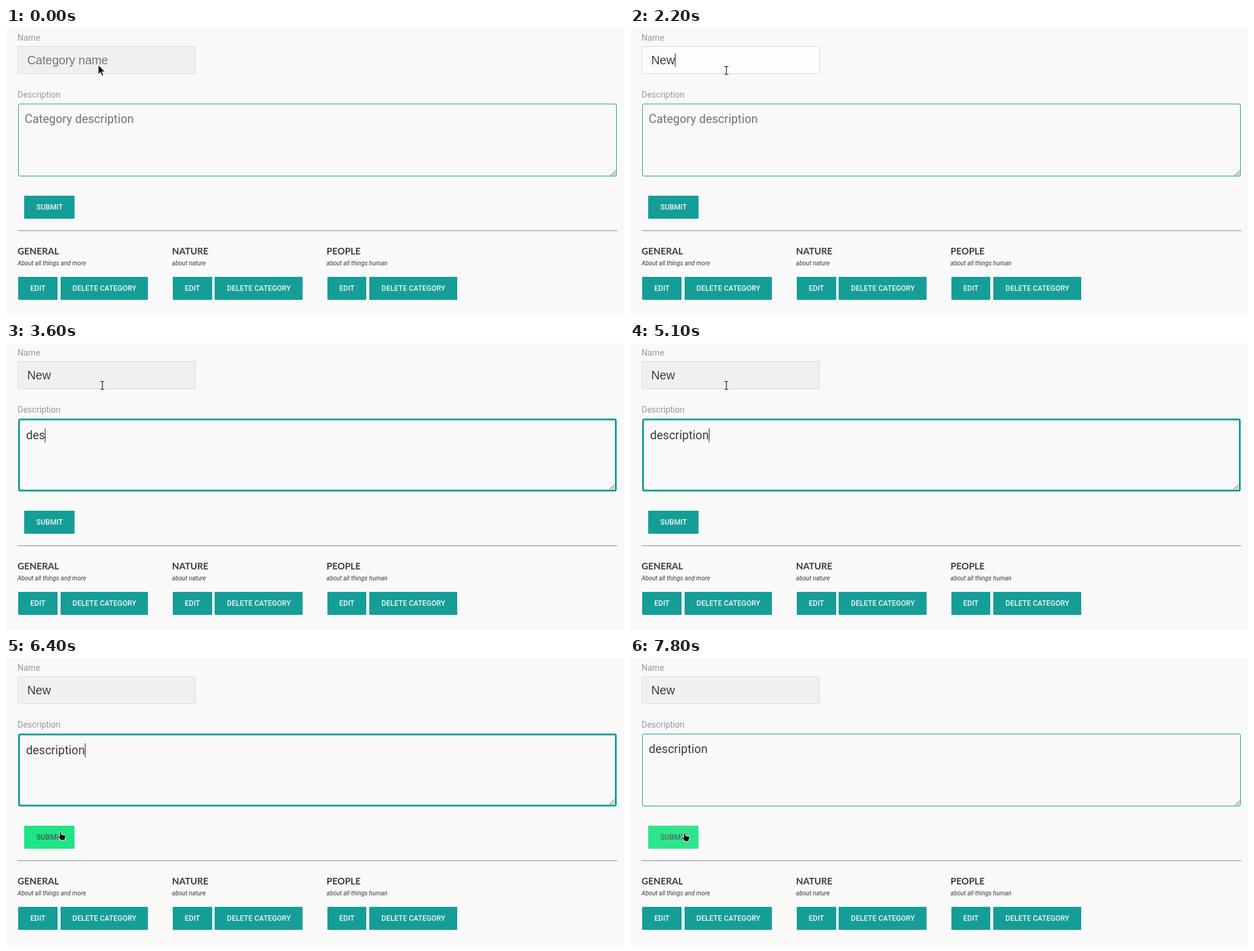
Write an HTML page that moves like this. It is 1019 px wide and 474 px high and loops after 8 s.

```html
<!DOCTYPE html>
<html lang="en">
<head>
<meta charset="utf-8">
<title>Category form</title>
<style>
  html, body { margin: 0; width: 100%; height: 100%; overflow: hidden; background: #f9f9f9; }
  svg { display: block; }
  text { font: 19.5px Roboto, sans-serif; fill: #3c3c3c; }
  .label { font-size: 14px; fill: #9896a6; }
  .button { font-size: 12px; font-weight: 500; fill: #f4f4f4; }
  .title { font: bold 15.2px Lato, sans-serif; }
  .note { font-size: 10.2px; font-style: italic; }
  #name { font-family: "Liberation Sans", Arial, sans-serif; }
  #caret { fill: #222; }
  #cursor path { stroke-linejoin: round; stroke-linecap: round; }
</style>
</head>
<body>
<svg width="1019" height="474" viewBox="0 0 1019 474">
  <text class="label" x="19" y="21">Name</text>
  <rect id="input" x="19.5" y="30.5" width="293" height="45" rx="2.5" stroke="#dadada"/>
  <text id="name" x="35" y="60"></text>

  <text class="label" x="19" y="115">Description</text>
  <rect id="area" fill="none" stroke="#159e97"/>
  <path id="grip" d="M997.5 243.5l8-8M1001.5 243.5l4-4" stroke="#555" fill="none"/>
  <text id="desc"></text>
  <rect id="caret" width="1"/>

  <g id="submit">
    <rect x="30" y="277" width="83" height="38" rx="1"/>
    <text class="button" x="50" y="300">SUBMIT</text>
  </g>

  <path d="M19 334.5h989" stroke="#9a9a9a"/>
  <path d="M19 335.5h989" stroke="#dedede"/>
  <g id="list"></g>

  <g id="cursor">
    <path id="arrow" d="M0 0V15.5L3.6 12.2L6.2 18L8.8 16.8L6.3 11.2H11.2Z" fill="#111" stroke="#fff"/>
    <g id="beam" fill="none">
      <path d="M-3 -6.5H-1L0 -5.5L1 -6.5H3M0 -5.5V5.5M-3 6.5H-1L0 5.5L1 6.5H3" stroke="#fff" stroke-width="3"/>
      <path d="M-3 -6.5H-1L0 -5.5L1 -6.5H3M0 -5.5V5.5M-3 6.5H-1L0 5.5L1 6.5H3" stroke="#111" stroke-width="1.2"/>
    </g>
    <path id="hand" d="M-1.6 0.6Q0 -1.2 1.4 0.6V4.4L7.2 5.6Q8.6 6 8.4 7.6L7.4 11V14H-0.8V12L-4.6 8Q-5 6 -3.4 6.2L-1.6 7.6Z" fill="#111" stroke="#fff"/>
  </g>
</svg>
<script>
const LOOP = 8000, STEP = 100;
const TEAL = [21, 158, 151], GREEN = [30, 228, 131];
const WHITE_TEXT = [244, 244, 244], DARK_TEXT = [66, 92, 80];
const NAME_KEYS = [1700, 1900, 2200];
const DESC_KEYS = [3200, 3400, 3600, 3900, 4100, 4200, 4400, 4600, 4700, 4800, 5100];

const $ = id => document.getElementById(id);
const set = (el, attrs) => { for (const k in attrs) el.setAttribute(k, attrs[k]); };
const ramp = (t, a, b) => Math.min(1, Math.max(0, (t - a) / (b - a)));
const smooth = u => u * u * (3 - 2 * u);
const within = (t, ...spans) => spans.some(([a, b]) => t >= a && t < b);
const mix = (a, b, u) => `rgb(${a.map((v, i) => Math.round(v + (b[i] - v) * u))})`;

const button = (left, right, label) => {
  const x = Math.round(left);
  return `<rect x="${x}" y="411" width="${Math.round(right) - x}" height="38" rx="1" fill="#159e97"/>
    <text class="button" x="${left + 20}" y="434">${label}</text>`;
};

$('list').innerHTML = [
  ['GENERAL', 'About all things and more'],
  ['NATURE', 'about nature'],
  ['PEOPLE', 'about all things human'],
].map(([title, note], i) => {
  const x = 19 + 254.75 * i;
  return `<text class="title" x="${x}" y="374">${title}</text>
    <text class="note" x="${x}" y="392">${note}</text>` +
    button(x + 1, x + 65.8, 'EDIT') + button(x + 70.6, x + 215.4, 'DELETE CATEGORY');
}).join('');

// Shows the typed part of a word, or the placeholder; returns the caret position.
function type(el, word, keys, t, placeholder, x) {
  const typed = word.slice(0, keys.filter(k => t >= k).length);
  el.textContent = typed || placeholder;
  el.style.fill = typed ? '#3c3c3c' : '#757575';
  return Math.round(x + (typed ? el.getComputedTextLength() : 0));
}

function drawFields(t) {
  const focused = within(t, [2700, 7300]);
  const x = focused ? 33 : 31;
  const nameEnd = type($('name'), 'New', NAME_KEYS, t, 'Category name', 35);
  const descEnd = type($('desc'), 'description', DESC_KEYS, t, 'Category description', x);
  const lit = ramp(t, 700, 1000) - ramp(t, 2600, 2900);
  set($('input'), { fill: mix([240, 240, 240], [253, 253, 253], lit) });
  set($('desc'), { x, y: focused ? 159 : 157 });
  set($('area'), focused
    ? { x: 21.5, y: 126.2, width: 984, height: 117.6, rx: 2, 'stroke-width': 3 }
    : { x: 20.5, y: 125.5, width: 986, height: 119, rx: 2.5, 'stroke-width': 1 });
  set($('grip'), { transform: focused ? 'translate(-2 -2)' : '' });

  const inName = within(t, [800, 1400], [1700, 2700]);
  const inDesc = within(t, [2700, 5700], [6300, 6900]);
  set($('caret'), {
    x: inName ? nameEnd : descEnd,
    y: inName ? 42 : 141,
    height: inName ? 22 : 23,
    visibility: inName || inDesc ? 'visible' : 'hidden',
  });
}

function drawSubmit(t) {
  const hover = ramp(t, 6100, 6400);
  const [box, label] = $('submit').children;
  box.style.fill = mix(TEAL, GREEN, hover);
  label.style.fill = mix(WHITE_TEXT, DARK_TEXT, hover);
  set($('submit'), { opacity: 1 - 0.1 * ramp(t, 6400, 6600) + 0.02 * ramp(t, 7300, 7800) });
}

function drawCursor(t) {
  const u = ramp(t, 5500, 6300);
  let x = 159 - 69 * (1 - (1 - u) ** 2);
  let y = 70 + 217 * smooth(u) + 2 * ramp(t, 6400, 6500);
  let shape = y < 76 || within(y, [125, 245]) ? 'beam' : y >= 277 ? 'hand' : 'arrow';
  if (t < 100) [x, y, shape] = [152, 61, 'arrow'];
  set($('cursor'), { transform: `translate(${Math.round(x)} ${Math.round(y)})` });
  for (const el of $('cursor').children) el.style.display = el.id === shape ? '' : 'none';
}

const start = performance.now();
function frame() {
  const t = Math.floor((performance.now() - start) % LOOP / STEP) * STEP;
  drawFields(t);
  drawSubmit(t);
  drawCursor(t);
  requestAnimationFrame(frame);
}
frame();
</script>
</body>
</html>
```
